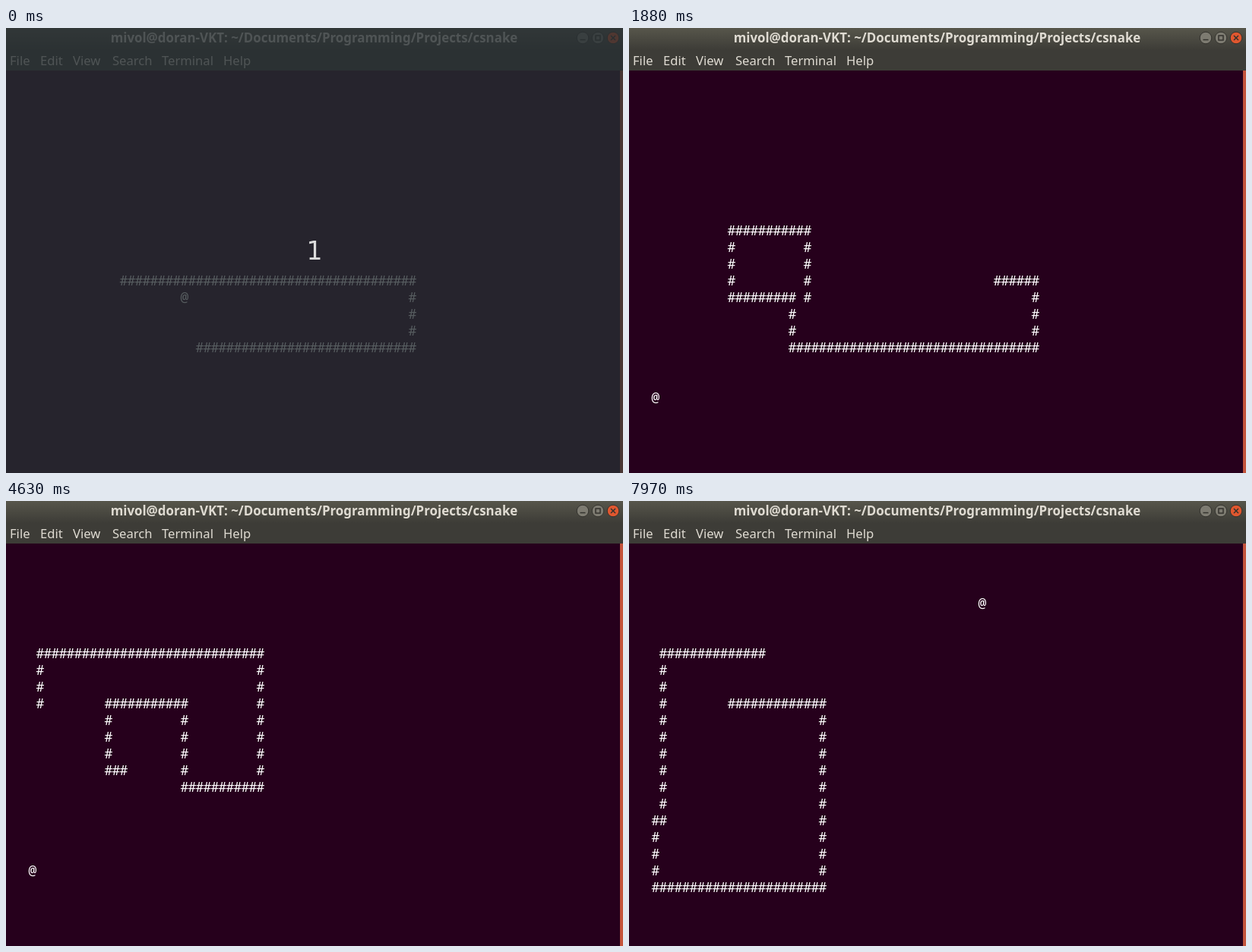
An HTML page with a canvas for the animation above (8000 ms loop, 812 px wide and 586 px high).

```html
<!DOCTYPE html>
<html lang="en">
<head>
<meta charset="utf-8">
<title>csnake</title>
<style>
  html, body { margin: 0; width: 100%; height: 100%; overflow: hidden; background: #26001c; }
  canvas { display: block; width: 812px; height: 586px; }
</style>
</head>
<body>
<canvas id="stage" width="812" height="586"></canvas>
<script>
const ctx = document.getElementById('stage').getContext('2d');
const W = 812, H = 586, LOOP = 8000;
const CELL_W = 10, CELL_H = 22, BASELINE = 75;
const START_LENGTH = 71;
const COUNTDOWN = 30;

// The whole route of the snake, walked from its first tail cell.
const ROUTE = 'R38 D4 L32 U3 L8 U4 R10 D5 R10 U8 L29 D10 L1 D4 R22 U11 L12';

// ms per cell, and cells per redraw: sideways moves are faster and shown in pairs.
const SIDEWAYS = { ms: 50, stride: 2 };
const UPRIGHT = { ms: 68.8, stride: 1 };
const MOVES = {
  R: { dx: 1, dy: 0, ...SIDEWAYS },
  L: { dx: -1, dy: 0, ...SIDEWAYS },
  U: { dx: 0, dy: -1, ...UPRIGHT },
  D: { dx: 0, dy: 1, ...UPRIGHT }
};

// Each piece of food moves on when the head reaches it.
const FOOD = [
  { col: 23, row: 13 },
  { col: 3, row: 19 },
  { col: 23, row: 9 },
  { col: 46, row: 3 }
];

function walk(col, row) {
  const cells = [{ col, row }];
  for (const leg of ROUTE.split(' ')) {
    const move = MOVES[leg[0]];
    for (let n = +leg.slice(1); n > 0; n--) {
      col += move.dx;
      row += move.dy;
      cells.push({ col, row, move });
    }
  }
  return cells;
}

const cells = walk(15, 12);

function schedule() {
  let head = START_LENGTH, time = COUNTDOWN, eaten = 0;
  const redraws = [{ time: 0, head: head - 1, eaten, grown: 0 }];
  while (head < cells.length) {
    const grown = eaten;
    const { col, row } = cells[head];
    if (col === FOOD[eaten].col && row === FOOD[eaten].row) eaten++;
    redraws.push({ time, head, eaten, grown });

    const move = cells[head + 1]?.move;
    if (!move) break;
    const stride = cells[head + move.stride]?.move === move ? move.stride : 1;
    head += stride;
    time += stride * move.ms;
  }
  return redraws;
}

const redraws = schedule();

function label(text, x, y, font, color, align = 'left') {
  ctx.font = font;
  ctx.fillStyle = color;
  ctx.textAlign = align;
  ctx.fillText(text, x, y);
}

function glyph(char, { col, row }) {
  label(char, (col + 0.5) * CELL_W, BASELINE + row * CELL_H,
    '500 18px "Noto Sans Mono", monospace', '#fff', 'center');
}

function button(x, fill, icon) {
  ctx.beginPath();
  ctx.arc(x, 13, 7.8, 0, Math.PI * 2);
  ctx.fillStyle = fill;
  ctx.fill();
  ctx.strokeStyle = '#33322d';
  ctx.lineWidth = 1;
  ctx.stroke();
  ctx.lineWidth = 1.5;
  ctx.stroke(new Path2D(icon));
}

function drawWindow() {
  ctx.fillStyle = '#26001c';
  ctx.fillRect(0, 0, W, H);
  ctx.fillStyle = '#c4553c';
  ctx.fillRect(808, 56, 4, H - 56);

  const bar = ctx.createLinearGradient(0, 0, 0, 29);
  bar.addColorStop(0, '#57564b');
  bar.addColorStop(1, '#3d3c37');
  ctx.fillStyle = bar;
  ctx.fillRect(0, 0, W, 56);

  label('mivol@doran-VKT: ~/Documents/Programming/Projects/csnake', 405.5, 18.5,
    'bold 16.9px "Noto Sans", sans-serif', '#dfdbd2', 'center');
  const menu = { File: 5, Edit: 45, View: 88, Search: 140, Terminal: 205, Help: 286 };
  for (const name in menu) {
    label(name, menu[name], 48.5, '16.6px "Noto Sans", sans-serif', '#dfdbd2');
  }
  button(759, '#7d7b71', 'M755.5 15.5h7');
  button(779, '#7d7b71', 'M776 10h6v6h-6z');
  button(799, '#e0572f', 'M796 10l6 6M802 10l-6 6');
}

function drawGame({ head, eaten, grown }) {
  const tail = head - START_LENGTH + 1 - grown;
  const body = cells.slice(tail, head + 1);
  const food = FOOD[eaten];
  const covered = body.some(c => c.col === food.col && c.row === food.row);
  if (!covered) glyph('@', food);
  for (const cell of body) glyph('#', cell);
}

function drawCountdown() {
  ctx.fillStyle = 'rgba(39, 47, 51, 0.78)';
  ctx.fillRect(0, 0, W, H);
  label('1', 406, 305, '33px "DejaVu Sans", sans-serif', '#dcdcdc', 'center');
}

const start = performance.now();

function frame() {
  const t = (performance.now() - start) % LOOP;
  drawWindow();
  drawGame(redraws.findLast(r => r.time <= t) ?? redraws[0]);
  if (t < COUNTDOWN) drawCountdown();
  requestAnimationFrame(frame);
}

frame();
</script>
</body>
</html>
```
